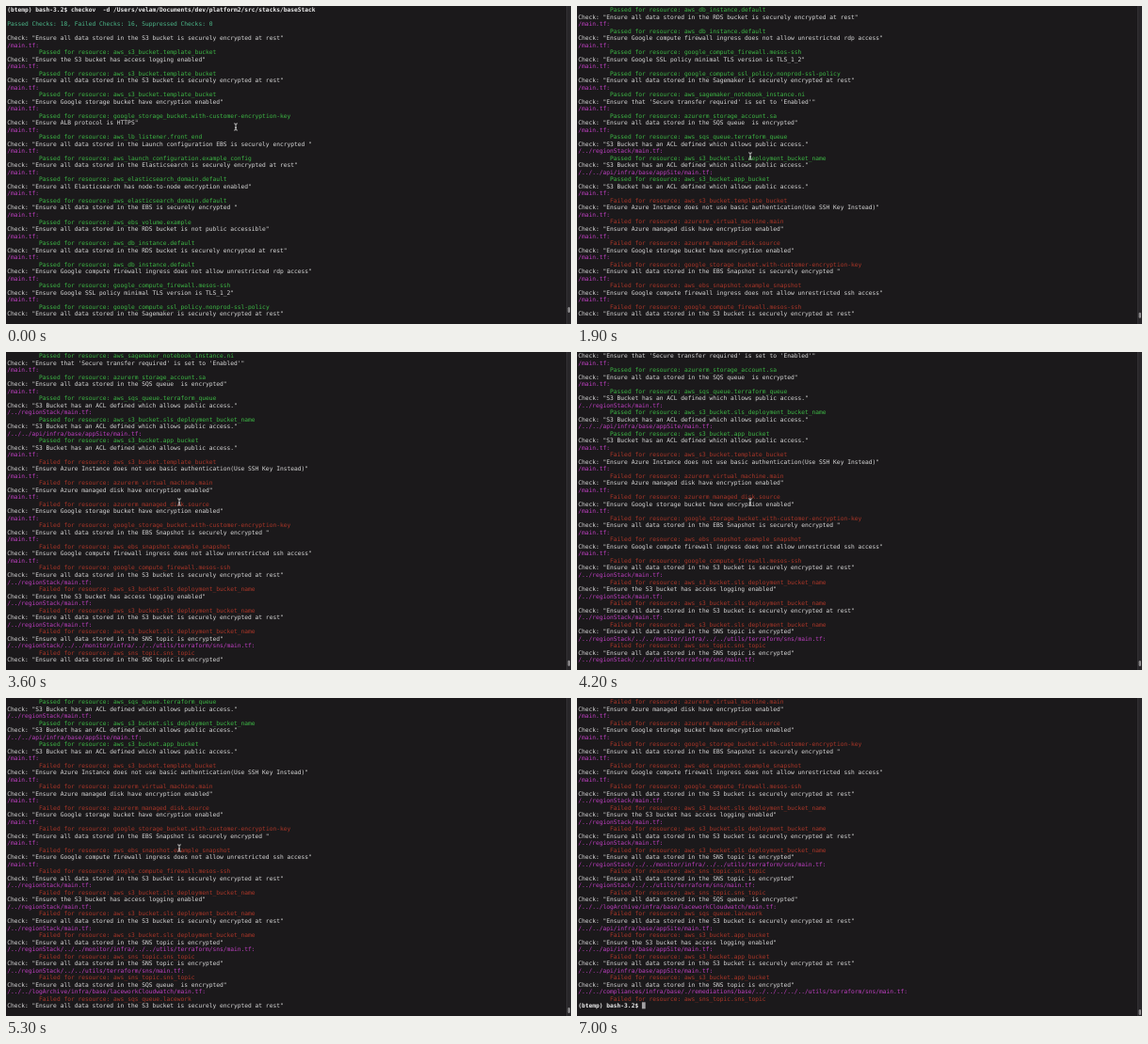
Write an HTML page that moves like this. It is 600 px wide and 338 px high and loops after 7300 ms.

```html
<!DOCTYPE html>
<html lang="en">
<head>
<meta charset="utf-8">
<title>Terminal scan</title>
<style>
  html, body { margin: 0; width: 100%; height: 100%; overflow: hidden; background: #1b191b; }
  svg { display: block; width: 100vw; height: 100vh; }
  text {
    font: 6.25px "DejaVu Sans Mono", monospace;
    white-space: pre;
    text-rendering: geometricPrecision;
  }
  .prompt { fill: #ececec; font-weight: bold; }
  .sum { fill: #4cb98a; }
  .check { fill: #dadada; }
  .path { fill: #bd3fc0; }
  .pass { fill: #3db845; }
  .fail { fill: #ab3628; }
</style>
</head>
<body>
<svg viewBox="0 0 600 338" preserveAspectRatio="none">
  <rect width="600" height="338" fill="#1b191b"/>
  <g id="log"></g>
  <rect x="595" width="5" height="338" fill="#282629"/>
  <rect x="595" width=".6" height="338" fill="#3a383b"/>
  <rect id="thumb" x="596.6" width="2.4" height="6" rx="1.2" fill="#8c8a8c"/>
  <path id="mouse" d="M-1.8-3.6Q0-3.6 0-2.6Q0-3.6 1.8-3.6M0-2.8V2.8M-1.8 3.6Q0 3.6 0 2.6Q0 3.6 1.8 3.6M-1 .9H1"
        fill="none" stroke="#d8d8d8" stroke-width=".9"/>
</svg>
<script>
const LOOP = 7300, STEP = 100, ROW = 7.51, CELL = 3.763, LEFT = 1.2, ROWS = 44;
const $ = id => document.getElementById(id);
const log = $('log'), thumb = $('thumb'), mouse = $('mouse');

const rest = t => `Ensure all data stored in the ${t} is securely encrypted at rest`;
const secure = t => `Ensure all data stored in the ${t} is securely encrypted `;
const topic = t => `Ensure all data stored in the ${t} is encrypted`;
const firewall = p => `Ensure Google compute firewall ingress does not allow unrestricted ${p} access`;
const S3 = rest('S3 bucket'), SNS = topic('SNS topic'), SQS = topic('SQS queue ');
const LOGS = 'Ensure the S3 bucket has access logging enabled';
const ACL = 'S3 Bucket has an ACL defined which allows public access.';
const STORE = 'Ensure Google storage bucket have encryption enabled';

const bucket = n => 'aws_s3_bucket.' + n;
const TEMPLATE = bucket('template_bucket'), APP = bucket('app_bucket');
const SLS = bucket('sls_deployment_bucket_name');
const KEY = 'google_storage_bucket.with-customer-encryption-key';
const MESOS = 'google_compute_firewall.mesos-ssh';
const ELASTIC = 'aws_elasticsearch_domain.default', DB = 'aws_db_instance.default';
const SNS_RES = 'aws_sns_topic.sns_topic';

const REGION = '/../regionStack', SITE = '/../../api/infra/base/appSite';
const UTILS = '/../../utils/terraform/sns';

// check, resource, folder
const passed = [
  [S3, TEMPLATE], [LOGS, TEMPLATE], [S3, TEMPLATE], [STORE, KEY],
  ['Ensure ALB protocol is HTTPS', 'aws_lb_listener.front_end'],
  [secure('Launch configuration EBS'), 'aws_launch_configuration.example_config'],
  [rest('Elasticsearch'), ELASTIC],
  ['Ensure all Elasticsearch has node-to-node encryption enabled', ELASTIC],
  [secure('EBS'), 'aws_ebs_volume.example'],
  ['Ensure all data stored in the RDS bucket is not public accessible', DB],
  [rest('RDS bucket'), DB],
  [firewall('rdp'), MESOS],
  ['Ensure Google SSL policy minimal TLS version is TLS_1_2', 'google_compute_ssl_policy.nonprod-ssl-policy'],
  [rest('Sagemaker'), 'aws_sagemaker_notebook_instance.ni'],
  ["Ensure that 'Secure transfer required' is set to 'Enabled'", 'azurerm_storage_account.sa'],
  [SQS, 'aws_sqs_queue.terraform_queue'],
  [ACL, SLS, REGION], [ACL, APP, SITE]
];
const failed = [
  [ACL, TEMPLATE],
  ['Ensure Azure Instance does not use basic authentication(Use SSH Key Instead)', 'azurerm_virtual_machine.main'],
  ['Ensure Azure managed disk have encryption enabled', 'azurerm_managed_disk.source'],
  [STORE, KEY],
  [secure('EBS Snapshot'), 'aws_ebs_snapshot.example_snapshot'],
  [firewall('ssh'), MESOS],
  [S3, SLS, REGION], [LOGS, SLS, REGION], [S3, SLS, REGION],
  [SNS, SNS_RES, REGION + '/../../monitor/infra' + UTILS],
  [SNS, SNS_RES, REGION + UTILS],
  [SQS, 'aws_sqs_queue.lacework', '/../../logArchive/infra/base/laceworkCloudwatch'],
  [S3, APP, SITE], [LOGS, APP, SITE], [S3, APP, SITE],
  [SNS, SNS_RES, '/../../compliances/infra/base/./remediations/base/../../..' + UTILS]
];

function el(name, attrs) {
  const e = document.createElementNS('http://www.w3.org/2000/svg', name);
  for (const k in attrs) e.setAttribute(k, attrs[k]);
  return log.appendChild(e);
}

const lines = [];
function print(cls, str, col = 0) {
  const t = el('text', { class: cls, x: LEFT + col * CELL, y: 6.2 + lines.length * ROW });
  t.textContent = str;
  lines.push(t);
}
function report(cls, word, list) {
  for (const [check, res, dir = ''] of list) {
    print('check', `Check: "${check}"`);
    print('path', dir + '/main.tf:');
    print(cls, `${word} for resource: ${res}`, 9);
  }
}

const PS = '(btemp) bash-3.2$ ';
print('prompt', PS + 'checkov  -d /Users/velam/Documents/dev/platform2/src/stacks/baseStack');
print('sum', '');
print('sum', 'Passed Checks: 18, Failed Checks: 16, Suppressed Checks: 0');
print('sum', '');
report('pass', 'Passed', passed);
report('fail', 'Failed', failed);
print('prompt', PS);
const END = lines.length - ROWS;
const block = el('rect', {
  x: LEFT + PS.length * CELL, y: 0.4 + (lines.length - 1) * ROW, width: CELL, height: 7, fill: '#a3a1a3'
});

// [ms, first visible row]
const scroll = [[0, 0], [700, 21], [1100, 33], [2400, 33], [2900, 38], [3700, 46],
                [4800, 46], [5300, 51], [5600, END], [LOOP, END]];

function track(keys, t) {
  const i = Math.max(1, keys.findIndex(k => k[0] >= t));
  const [t0, a] = keys[i - 1], [t1, b] = keys[i];
  return a + (b - a) * (t - t0) / (t1 - t0);
}

function draw(ms) {
  const t = Math.floor(ms % LOOP / STEP) * STEP;
  const top = Math.round(track(scroll, t));
  log.setAttribute('transform', `translate(0 ${-top * ROW})`);
  lines.forEach((l, i) => l.style.display = i >= top && i < top + ROWS ? '' : 'none');
  block.style.display = top === END ? '' : 'none';
  thumb.setAttribute('y', 320 + 11 * top / END);

  const m = Math.min(1, Math.max(0, (t - 1200) / 400));
  mouse.setAttribute('transform', `translate(${244 - 60 * m} ${128.5 + 31 * m})`);
  mouse.style.display = t < 5700 ? '' : 'none';
}

const start = performance.now();
(function tick() {
  draw(performance.now() - start);
  requestAnimationFrame(tick);
})();
</script>
</body>
</html>
```
